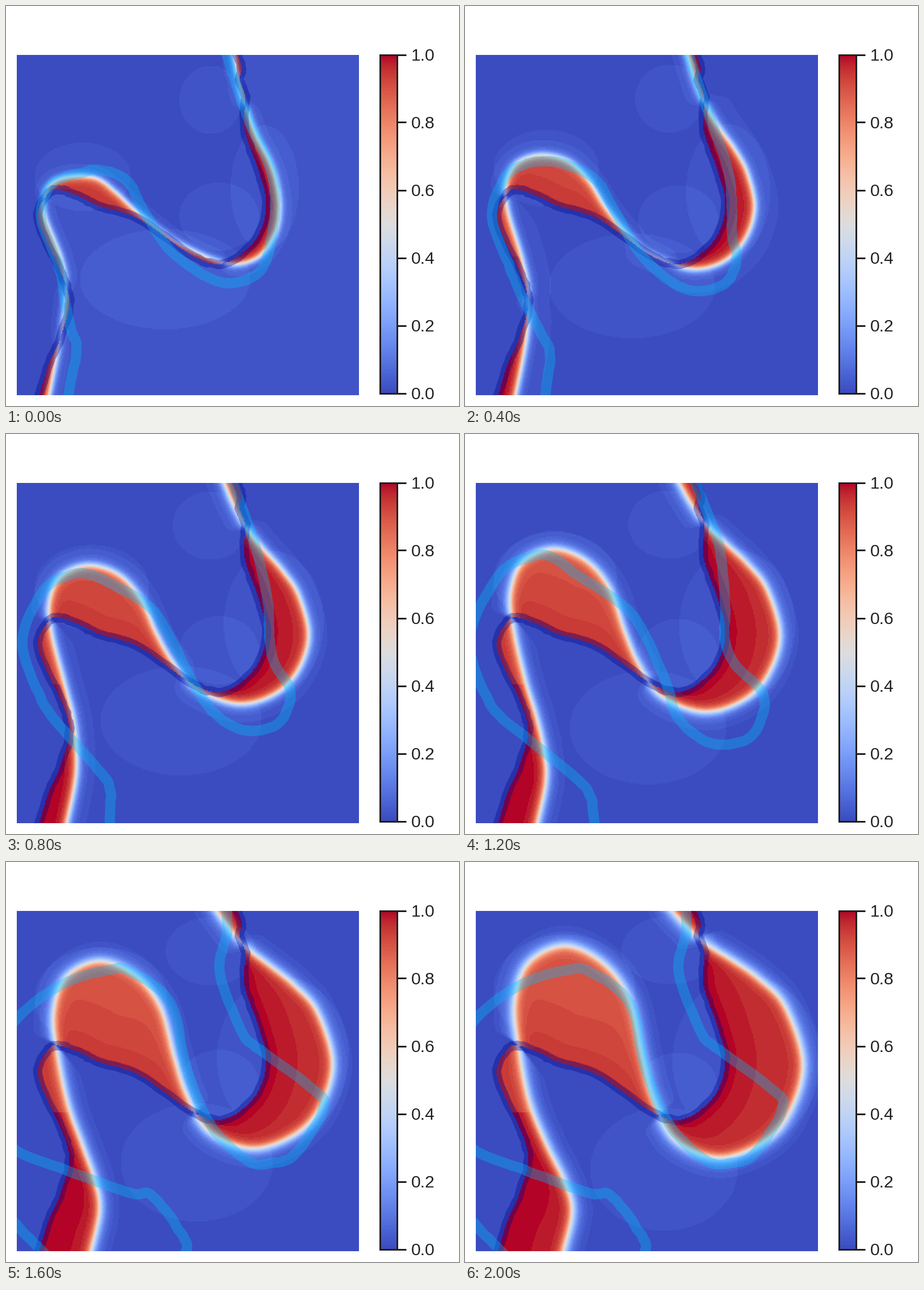
Animation of 797x703 px, one loop 2400 ms. Source, as a matplotlib script:

```python
import numpy as np
import matplotlib.pyplot as plt
from matplotlib.animation import FuncAnimation
from matplotlib.patches import Rectangle
from matplotlib.path import Path

W, H, DPI = 797, 703, 64
LEFT, RIGHT, TOP, BOTTOM = 19, 621, 86, 684
FRAMES = 6
INK = "#231f20"

gx, gy = np.meshgrid(np.arange(LEFT + 1, RIGHT, 2.0), np.arange(TOP + 1, BOTTOM, 2.0))
grid = np.column_stack([gx.ravel(), gy.ravel()])


def spline(points, steps=8):
    """Catmull-Rom curve through the points."""
    p = np.asarray(points, float)
    p = np.vstack([2 * p[0] - p[1], p, 2 * p[-1] - p[-2]])
    t = np.linspace(0, 1, steps, endpoint=False)[:, None]
    out = [0.5 * (2 * b + (c - a) * t + (2 * a - 5 * b + 4 * c - d) * t ** 2
                  + (3 * b - a - 3 * c + d) * t ** 3)
           for a, b, c, d in zip(p, p[1:], p[2:], p[3:])]
    return np.vstack(out + [p[-2:-1]])


def inside(poly):
    return Path(poly).contains_points(grid).reshape(gx.shape)


def distance(line):
    best = np.full(gx.shape, 1e9)
    for (x0, y0), (x1, y1) in zip(line[:-1], line[1:]):
        dx, dy = x1 - x0, y1 - y0
        t = np.clip(((gx - x0) * dx + (gy - y0) * dy) / (dx * dx + dy * dy + 1e-9), 0, 1)
        np.minimum(best, (gx - x0 - t * dx) ** 2 + (gy - y0 - t * dy) ** 2, out=best)
    return np.sqrt(best)


def rough(line, amount, seed):
    return line + np.random.default_rng(seed).normal(0, amount, line.shape)


# Fixed bank of the river.
bank = spline([(404, 78), (415, 108), (411, 130), (421, 160), (420, 218), (444, 288),
               (458, 350), (439, 411), (385, 452), (330, 440), (235, 375), (165, 352),
               (130, 335), (93, 323), (75, 329), (56, 375), (95, 465), (108, 500),
               (111, 530), (94, 588), (75, 630), (56, 692)])

# Key points of the moving front: first and last place.
front_from, front_to = np.array([
    [(400, 78), (357, 78)], [(411, 140), (392, 115)], [(425, 188), (425, 145)],
    [(441, 230), (470, 173)], [(462, 270), (517, 206)], [(475, 308), (563, 255)],
    [(481, 355), (594, 355)], [(472, 402), (568, 445)], [(440, 443), (520, 495)],
    [(385, 452), (445, 519)], [(310, 421), (370, 488)], [(265, 390), (330, 415)],
    [(225, 358), (311, 340)], [(193, 328), (288, 240)], [(160, 304), (241, 177)],
    [(118, 300), (175, 148)], [(84, 310), (112, 178)], [(68, 335), (88, 245)],
    [(68, 370), (94, 325)], [(97, 445), (112, 420)], [(106, 500), (143, 497)],
    [(100, 560), (174, 560)], [(90, 610), (188, 615)], [(74, 692), (171, 692)],
], float).swapaxes(0, 1)

# Key points of the wandering stream, then its course after the cut-off.
stream_from, stream_to = np.array([
    [(386, 78), (402, 78)], [(409, 150), (439, 170)], [(433, 215), (450, 215)],
    [(465, 285), (458, 300)], [(474, 350), (457, 360)], [(468, 400), (475, 405)],
    [(460, 440), (526, 462)], [(445, 468), (505, 530)], [(415, 484), (445, 546)],
    [(380, 486), (400, 525)], [(340, 468), (370, 490)], [(285, 425), (355, 440)],
    [(240, 355), (310, 340)], [(212, 306), (270, 295)], [(165, 288), (200, 249)],
    [(130, 294), (150, 215)], [(98, 303), (110, 218)], [(74, 322), (60, 248)],
    [(62, 375), (8, 360)], [(94, 460), (45, 475)], [(103, 515), (110, 535)],
    [(115, 570), (190, 600)], [(124, 605), (220, 635)], [(107, 692), (228, 692)],
], float).swapaxes(0, 1)

stream_late = [
    (388, 78), (389, 125), (376, 195), (415, 298), (440, 325), (535, 395), (559, 432),
    (510, 512), (470, 529), (425, 525), (360, 462), (317, 360), (290, 248), (220, 193),
    (180, 190), (95, 217), (10, 286), (-40, 390), (8, 498), (110, 543), (220, 582),
    (255, 585), (303, 645), (311, 692), (200, 780), (82, 700), (8, 627)]

bank_gap = distance(bank)
right_of_bank = inside(np.vstack([bank, [(640, 692), (640, 78)]]))
lag = np.interp(front_from[:, 1], [380, 450], [0.87, 1.25])[:, None]


def front_at(s):
    """The lower reaches start more slowly than the upper ones."""
    return spline(front_from + (front_to - front_from) * s ** lag)


def stream_at(i):
    if i > 3:
        return spline(stream_late)
    return spline(stream_from + (stream_to - stream_from) * (i / 3) ** 1.2)


def haze(s):
    """Faint one-step ovals that widen with the bends."""
    ovals = [(360, 165 - 10 * s, 55 + 30 * s, 60),
             (280 + 70 * s, 480 + 60 * s, 150 - 20 * s, 88 + 20 * s),
             (135 + 40 * s, 300 - 75 * s, 85 + 40 * s, 60 + 38 * s),
             (455 + 40 * s, 320 + 30 * s, 60 + 70 * s, 110 + 40 * s),
             (375, 370 + 25 * s, 70, 60)]
    level = 0.02 * (1 - s) ** 4 * right_of_bank
    for cx, cy, rx, ry in ovals:
        level = level + 0.02 * (((gx - cx) / rx) ** 2 + ((gy - cy) / ry) ** 2 < 1)
    return level


def field(s):
    """Probability map: high between bank and front, fading past the front."""
    front = front_at(s)
    d = distance(front)
    lens = inside(np.vstack([bank, front[::-1]]))
    peak = np.where(gx > 335, 0.95, np.where(gy < 440, 0.9, 0.97))
    peak = np.minimum(peak + 0.06 * np.exp(-bank_gap / 50), 1)
    fill = peak - (peak - 0.5) * np.exp(-d / (4.5 + 1.5 * s))
    side = 1 / (1 + np.exp(np.clip((d - bank_gap) / 1.5, -30, 30)))
    glow = side * ((0.48 - 0.06 * s) * np.exp(-(d / (5.5 + 3 * s)) ** 1.3)
                   + (0.02 + 0.06 * s) * np.exp(-(d / 25) ** 2))
    v = np.where(lens, fill, glow + haze(s) * (1 - glow))
    return np.round(np.clip(v, 0, 1) * 50) / 50


maps = [field(i / (FRAMES - 1)) for i in range(FRAMES)]

fig = plt.figure(figsize=(W / DPI, H / DPI), dpi=DPI, facecolor="white")
ax = fig.add_axes([0, 0, 1, 1])
px = 72 / DPI
heat = dict(cmap="coolwarm", vmin=0, vmax=1, interpolation="nearest", aspect="auto")

chart = ax.imshow(maps[0], extent=(LEFT, RIGHT, BOTTOM, TOP), **heat)
frame = Rectangle((LEFT, TOP), RIGHT - LEFT, BOTTOM - TOP, transform=ax.transData)
pen = dict(alpha=0.35, solid_capstyle="butt", solid_joinstyle="round")
edge, = ax.plot(*rough(bank, 0.7, 4).T, color="darkblue", lw=16 * px, **pen)
stream, = ax.plot([], [], color="deepskyblue", lw=18 * px, **pen)
for line in (edge, stream):
    line.set_clip_path(frame)

bar_top, bar_h = 85.5, 595
ax.imshow(np.linspace(1, 0, 256)[:, None],
          extent=(658.5, 688.5, bar_top + bar_h, bar_top), **heat)
ax.add_patch(Rectangle((658.5, bar_top), 30, bar_h, fill=False, ec=INK, lw=3 * px))
for k in range(6):
    y = bar_top + bar_h * (1 - k / 5)
    ax.plot([688.5, 704], [y, y], color=INK, lw=3 * px, solid_capstyle="butt")
    ax.text(713, y + 10.5, f"{k / 5:.1f}", family="Liberation Sans", size=30 * px,
            color=INK, va="baseline")

ax.set_xlim(0, W)
ax.set_ylim(H, 0)
ax.axis("off")


def draw(i):
    chart.set_data(maps[i])
    stream.set_data(*rough(stream_at(i), 0.35, 20).T)
    return chart, stream


anim = FuncAnimation(fig, draw, frames=FRAMES, interval=400, repeat=True,
                     repeat_delay=0, blit=False)
plt.show()
```
